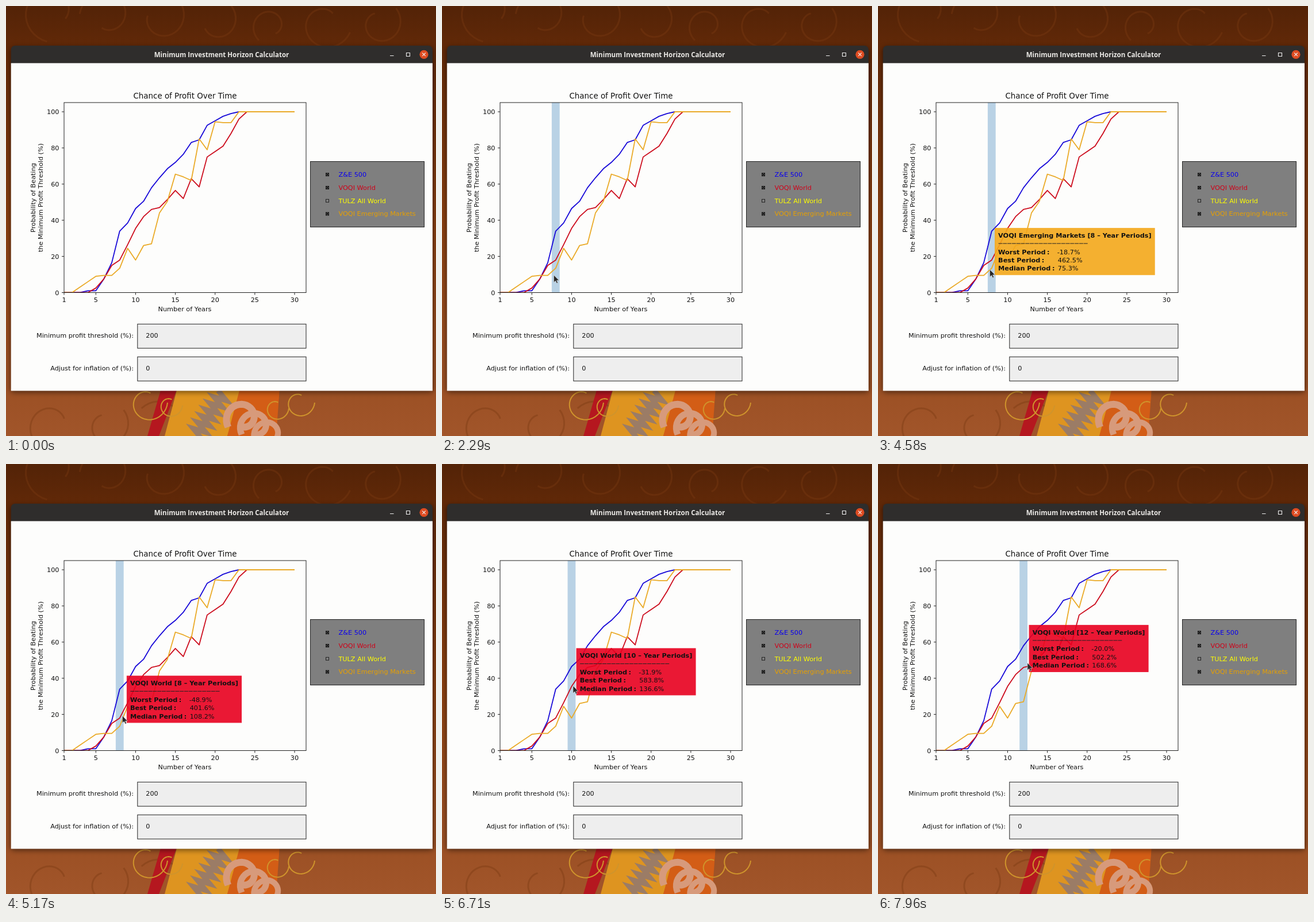
Write an HTML page that moves like this. It is 748 by 748 pixels and loops after 8000 ms.

```html
<!DOCTYPE html>
<html lang="en">
<head>
<meta charset="utf-8">
<title>Minimum Investment Horizon Calculator</title>
<style>
  html, body { margin: 0; width: 100%; height: 100%; overflow: hidden; background: #6a2c0a; }
  svg { display: block; width: 100vw; height: 100vh; }
  text { font: 11.25px "DejaVu Sans", sans-serif; fill: #111; white-space: pre; }
  .bold { font-weight: bold; }
  .mid { text-anchor: middle; }
  .end { text-anchor: end; }
  .thin { fill: none; stroke: #222; stroke-width: 1; }
</style>
</head>
<body>
<svg viewBox="0 0 748 748">
  <defs>
    <linearGradient id="wall" x2="0" y2="1">
      <stop offset="0" stop-color="#532307"/>
      <stop offset=".1" stop-color="#622908"/>
      <stop offset=".5" stop-color="#893f10"/>
      <stop offset="1" stop-color="#a1552a"/>
    </linearGradient>
    <filter id="blur" x="-5%" y="-5%" width="110%" height="110%"><feGaussianBlur stdDeviation="5"/></filter>
    <clipPath id="axes"><rect x="101" y="168" width="421" height="331"/></clipPath>
  </defs>

  <rect width="748" height="748" fill="url(#wall)"/>
  <g id="swirls" fill="none" stroke="#7a3a12" stroke-width="3" opacity=".4"></g>
  <g id="art">
    <path d="M270 665H298L266 748H246Z" fill="#b5171f"/>
    <path d="M298 665H412L385 748H276Z" fill="#de9420"/>
    <path d="M407 665H476L470 748H385Z" fill="#d35d16"/>
  </g>

  <rect x="8" y="72" width="735" height="600" rx="6" opacity=".5" filter="url(#blur)"/>
  <rect x="8.7" y="69" width="733.3" height="40" rx="7" fill="#2f2d2c"/>
  <rect x="8.7" y="99.4" width="733.3" height="570" fill="#fdfdfc"/>
  <text class="mid" x="375" y="89" style="font:bold 11.5px 'Open Sans',sans-serif;fill:#eceae7">Minimum Investment Horizon Calculator</text>
  <g fill="none" stroke="#eee" stroke-width="1.1">
    <path d="M668 86.5h6.5M696.5 81.5h6v6h-6z"/>
    <circle cx="727" cy="84.3" r="7.6" fill="#df4c22" stroke="none"/>
    <path d="M724.2 81.5l5.6 5.6m0 -5.6l-5.6 5.6"/>
  </g>

  <g clip-path="url(#axes)">
    <rect id="band" y="168" width="13.8" height="331" fill="#b9d2e5"/>
    <g id="lines" fill="none" stroke-width="1.8" stroke-linejoin="round"></g>
  </g>
  <rect class="thin" x="101" y="168" width="421" height="330.5"/>
  <g id="ticks"></g>
  <text class="mid" x="311.5" y="161" style="font-size:13.4px">Chance of Profit Over Time</text>
  <text class="mid" x="311" y="531">Number of Years</text>
  <text class="mid" transform="translate(51 333.5) rotate(-90)">Probability of Beating</text>
  <text class="mid" transform="translate(64 333.5) rotate(-90)">the Minimum Profit Threshold (%)</text>

  <g id="fields"></g>
  <rect x="529.5" y="270.5" width="198" height="114" fill="#7f7f7f" stroke="#222"/>
  <g id="legend"></g>

  <g id="tip">
    <rect id="tipBox" height="81" opacity=".9"/>
    <text id="tipTitle" class="bold" x="5.6" y="16.5"></text>
    <path d="M6 26.5h155.5" stroke="#222" stroke-dasharray="7 .8"/>
  </g>
  <path id="cursor" d="M0 0V12.6L3 9.9 5 14.2 7 13.3 5.1 9.2H9Z" fill="#262626" stroke="#ddd" stroke-width=".6"/>
</svg>
<script>
const LOOP = 8000, LAG = 80, REACH = 10, YEARS = 30;
const $ = id => document.getElementById(id);
const xOf = year => 101 + (year - 1) * 401 / 29;
const yearAt = x => Math.round((x - 101) * 29 / 401 + 1);
const yOf = pct => 498.5 - pct * 3.145;

function add(parent, tag, attrs, text = '') {
  const el = document.createElementNS('http://www.w3.org/2000/svg', tag);
  for (const k in attrs) el.setAttribute(k, attrs[k]);
  el.textContent = text;
  parent.append(el);
  return el;
}

// Wallpaper: faint seeded swirls and a few large curls
let seed = 7;
const random = () => (seed = seed * 16807 % 2147483647) / 2147483647;

function curl(parent, x, y, r, from, turns, attrs = {}) {
  const points = Array.from({ length: 30 }, (_, i) => {
    const a = from + turns * 2 * Math.PI * i / 29, d = r * (1 - .5 * i / 29);
    return `${x + d * Math.cos(a)},${y + d * Math.sin(a)}`;
  });
  add(parent, 'polyline', { points: points.join(' '), fill: 'none', ...attrs });
}

for (let i = 0; i < 10; i++) {
  const y = i < 7 ? 10 + random() * 30 : 730;
  curl($('swirls'), 80 + i % 7 * 95, y, 25 + random() * 30, random() * 6, .8);
}
const brush = Array.from({ length: 14 }, (_, i) =>
  `${378 - i * 3.6 + (i % 2 ? 9 : -9)},${675 + i * 5.5 + (i % 2 ? 6 : -6)}`);
add($('art'), 'polyline', { points: brush.join(' '), fill: 'none', stroke: '#9b7c66', 'stroke-width': 9 });
for (let i = 0; i < 3; i++) {
  curl($('art'), 412 + i * 22, 717 + i * 14, 30 - i * 2, 2.6, .85, { stroke: '#d79a7b', 'stroke-width': 12 - i });
}
for (const [x, y, r] of [[246, 690, 35], [285, 695, 22], [510, 690, 27], [470, 700, 22]]) {
  curl($('art'), x, y, r, 0, .8, { stroke: '#cf942c', 'stroke-width': 2 });
}

// Yearly percentages: 0 before the first year given, 100 after the last.
// Stats hold the worst, best and median result, starting with year 8.
const series = [
  { name: 'Z&E 500', line: '#1708d8', label: '#0a00f0', from: 4,
    data: [1, 1, 7.5, 16.5, 34, 38.5, 46.5, 50.5, 58, 63.5, 68.5, 72, 76.5, 83, 84.5, 92.5, 95, 97.5, 99] },
  { name: 'VOQI World', line: '#cc0b1c', label: '#d00018', tip: '#e8001f', from: 5,
    data: [2.5, 7.5, 15, 18, 26.5, 35.5, 42, 46, 47, 51.5, 56.5, 52, 63, 58.5, 75, 78, 81, 88, 96],
    stats: [[-48.9, 401.6, 108.2], [-45.8, 477.8, 135.1], [-31.9, 583.8, 136.6],
            [-27.4, 541, 152.3], [-20, 502.2, 168.6]] },
  { name: 'TULZ All World', label: '#ffff00' },
  { name: 'VOQI Emerging Markets', line: '#eaaa27', label: '#e8a000', tip: '#f4a81a', from: 3,
    data: [3, 6, 9, 9.5, 9.5, 13.5, 24.5, 18, 26, 27, 44, 50.5, 65.5, 64, 62, 85, 79, 94.5, 94, 94],
    stats: [[-18.7, 462.5, 75.3]] }
];
const heightAt = (s, year) => yOf(year < s.from ? 0 : s.data[year - s.from] ?? 100);

series.forEach((s, i) => {
  const y = 293 + i * 22.8;
  add($('legend'), 'rect', { x: 556.5, y: y - 2.3, width: 5, height: 5, class: 'thin' });
  add($('legend'), 'text', { x: 578.5, y: y + 4, style: `fill:${s.label}` }, s.name);
  if (!s.data) return;
  add($('legend'), 'path', { d: `M556.5 ${y - 2.3}l5 5m0 -5l-5 5`, stroke: '#111', 'stroke-width': 1.4 });
  const points = Array.from({ length: YEARS }, (_, n) => `${xOf(n + 1)},${heightAt(s, n + 1)}`);
  add($('lines'), 'polyline', { points: points.join(' '), stroke: s.line });
});

for (let n = 0; n <= YEARS; n += 5) {
  const year = n || 1;
  add($('ticks'), 'path', { d: `M${xOf(year)} 498.5v4`, class: 'thin' });
  add($('ticks'), 'text', { x: xOf(year), y: 515.2, class: 'mid' }, year);
}
for (let pct = 0; pct <= 100; pct += 20) {
  add($('ticks'), 'path', { d: `M101 ${yOf(pct)}h-4`, class: 'thin' });
  add($('ticks'), 'text', { x: 92.5, y: yOf(pct) + 4.1, class: 'end' }, pct);
}

[['Minimum profit threshold (%):', 200], ['Adjust for inflation of (%):', 0]].forEach(([label, value], i) => {
  const y = 553.3 + i * 57;
  add($('fields'), 'rect', { x: 228.8, y, width: 293.2, height: 42, fill: '#eee', stroke: '#222' });
  add($('fields'), 'text', { x: 222, y: y + 24.1, class: 'end' }, label);
  add($('fields'), 'text', { x: 243.3, y: y + 24.1 }, value);
});

const values = ['Worst', 'Best', 'Median'].map((word, i) => {
  const y = 45 + i * 14.4;
  const head = add($('tip'), 'text', { x: 5.6, y, class: 'bold' }, word + ' Period');
  add(head, 'tspan', { dx: 2.5 }, ':');
  return add($('tip'), 'text', { x: i ? 109.3 : 108.3, y });
});

// Pointer stops: time, x, y
const stops = [
  [500, 205, 790], [1400, 194.5, 475], [1800, 194.5, 475], [2800, 194.5, 461], [4600, 194.5, 458.5],
  [5780, 211, 416], [6630, 225, 393], [6710, 228, 386], [7880, 254, 352.5], [7960, 260, 346]
];

function pointer(t) {
  const i = stops.findIndex(s => s[0] > t);
  if (i < 1) return stops.at(i).slice(1);
  const [t0, x0, y0] = stops[i - 1], [t1, x1, y1] = stops[i];
  const k = (t - t0) / (t1 - t0);
  return [x0 + (x1 - x0) * k, y0 + (y1 - y0) * k];
}

// Closest series with details for that year, if any is within reach
function hovered(year, y) {
  const gap = s => Math.abs(heightAt(s, year) - y);
  return series.filter(s => s.stats?.[year - 8] && gap(s) < REACH).sort((a, b) => gap(a) - gap(b))[0];
}

let shown = '';
function fillTip(s, year) {
  const title = `${s.name} [${year} – Year Periods]`;
  if (title === shown) return;
  shown = $('tipTitle').textContent = title;
  values.forEach((el, i) => el.textContent = s.stats[year - 8][i].toFixed(1) + '%');
  $('tipBox').setAttribute('fill', s.tip);
  $('tipBox').setAttribute('stroke', s.tip);
  $('tipBox').setAttribute('width', $('tipTitle').getComputedTextLength() + 11.2);
}

const show = (el, on) => el.setAttribute('visibility', on ? 'visible' : 'hidden');
const move = (el, x, y) => el.setAttribute('transform', `translate(${x} ${y})`);

function draw(t) {
  move($('cursor'), ...pointer(t));

  // The chart reacts slightly after the pointer moves.
  const [x, y] = pointer(Math.max(0, t - LAG));
  const year = yearAt(x);
  show($('band'), y < 498.5);
  $('band').setAttribute('x', xOf(year) - 6.9);

  const target = hovered(year, y);
  show($('tip'), target);
  if (target) {
    fillTip(target, year);
    move($('tip'), x + 9, y - 72);
  }
}

const start = performance.now();
function tick() {
  draw((performance.now() - start) % LOOP);
  requestAnimationFrame(tick);
}
tick();
</script>
</body>
</html>
```
